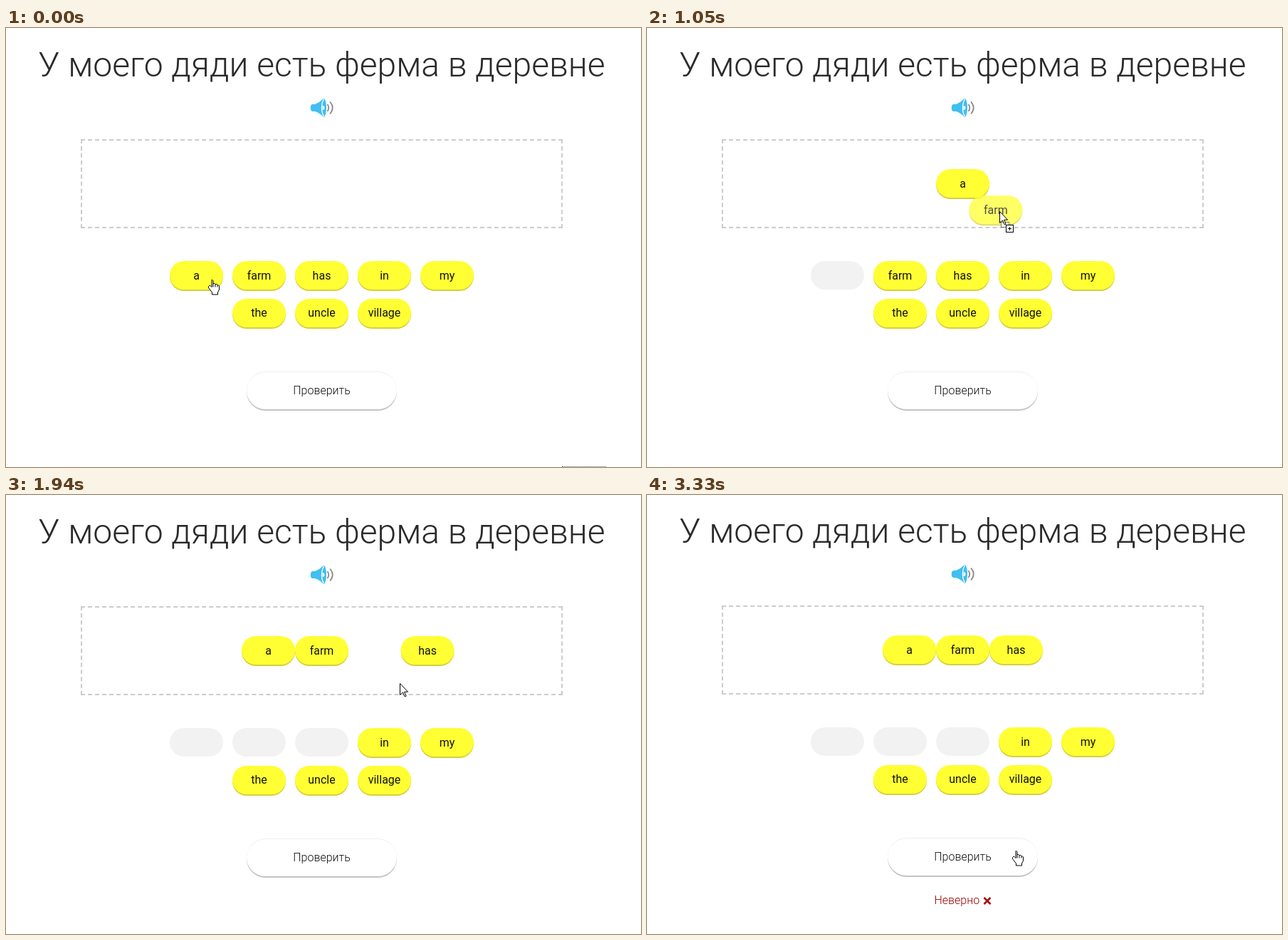
These frames come from a looping animation (892x616 px, 4.12 s). An HTML page:

```html
<!DOCTYPE html>
<html lang="ru">
<head>
<meta charset="utf-8">
<style>
html, body { margin: 0; width: 100%; height: 100%; overflow: hidden; background: #fff; }
body { position: relative; font: 16px Roboto, sans-serif; }
body div, svg { position: absolute; }
#scene { left: 0; top: 0; width: 892px; height: 616px; }
h1 { position: absolute; left: 0; top: 20px; width: 887px; margin: 0; text-align: center; white-space: nowrap;
  font-weight: 300; font-size: 48px; line-height: 64px; color: #2b2b2b; }
#zone { left: 105px; top: 156px; width: 673px; height: 121px; border: 2px dashed #ccc; }
.tile, .slot { width: 75px; height: 40px; border-radius: 20px; }
.slot { background: #f2f2f2; }
.tile { background: #ff3; box-shadow: 0 2px #d6d03c; color: #111; text-align: center; line-height: 41px; }
#check { left: 338px; top: 482px; width: 211px; height: 53px; border-radius: 27px; box-sizing: border-box;
  border-top: 1px solid #eee; box-shadow: 0 2px #c4c4c4; text-align: center; line-height: 51px; font-weight: 300; color: #111; }
#wrong { left: 403.5px; top: 560px; line-height: 20px; font-weight: 300; color: #900; white-space: nowrap; }
#mark { left: 68px; top: 5px; }
#dots { left: 781px; top: 615px; width: 62px; border-top: 1px dotted #555; }
svg { overflow: visible; }
#cursor { left: 0; top: 0; width: 1px; height: 1px; }
#cursor path, #cursor rect { fill: #fff; stroke: #000; }
</style>
</head>
<body>
<div id="scene">
  <h1>У моего дяди есть ферма в деревне</h1>
  <svg style="left:427px;top:98px" width="34" height="28" fill="none">
    <path fill="#41bff0" d="M3 9h4Q13 7 17 2.5Q19 1 20 1C24 5 24 22 20 27Q18 26.500 16 24Q12 20.500 7 19H3Q.8 18 .8 14T3 9"/>
    <path stroke="#fff" stroke-width="1.300" d="M19.500 2C15.500 8 15.500 20 19.500 26"/>
    <path fill="#fff" d="M17.500 11q3 0 3 3t-3 3z"/>
    <path stroke="#888" stroke-width="1.700" d="M24.500 9q3.500 5 0 10M28 5.500q7.500 8.500 0 17"/>
  </svg>
  <div id="zone"></div>
  <div id="check">Проверить</div>
  <div id="wrong">Неверно<svg id="mark" width="12" height="11"><path d="M1.500 1l9 9m0-9l-9 9" stroke="#a50d0d" stroke-width="2.600"/></svg></div>
</div>
<div id="dots"></div>
<svg id="cursor">
  <path id="hand" d="M0 .5h1l1 1v4h2l1 1h2l1 1h1l1.500 1.500v5l-2 4v3h-8v-3l-5-6.500v-2l1-1h1.500l2 2v-9zM2 5.500v5M5 6.500v4M8 7.500v3"/>
  <g id="copy">
    <rect x="2.500" y="15.500" width="11" height="7" stroke-dasharray="1 1"/>
    <rect x="9.500" y="19.500" width="10" height="10"/>
    <path d="M12 24.500h5M14.500 22v5"/>
  </g>
  <path id="arrow" d="M.5.5v16l4-3.600 2.700 6 2-.8-2.600-5.900h5z"/>
</svg>
<script>
const LOOP = 4120, SLIDE = 500, W = 75;
const $ = id => document.getElementById(id);
const show = (el, on) => el.style.display = on ? '' : 'none';
const place = (el, x, y) => el.style.transform = `translate(${x}px,${y}px)`;

function add(cls, text, parent = $('scene')) {
  const el = document.createElement('div');
  el.className = cls;
  el.textContent = text;
  return parent.appendChild(el);
}

const words = ['a', 'farm', 'has', 'in', 'my', 'the', 'uncle', 'village'].map((text, i) => {
  const x = i < 5 ? 230 + 88 * i : 318 + 88 * (i - 5), y = i < 5 ? 327 : 380;
  const slot = add('slot', ''), tile = add('tile', text);
  place(slot, x, y);
  if (i > 4) tile.style.lineHeight = '39px';
  return { text, x, y, tile };
});

// grab and drop times of the first three words
const drags = [[130, 565], [860, 1225], [1630, 1935]];
// pointer route: time, x, y
const route = [
  [0, 289, 353], [130, 289, 353], [180, 289, 346], [500, 298, 262], [570, 299, 260], [630, 326, 290],
  [790, 361, 347], [870, 361, 349], [960, 430, 302], [1050, 495, 257], [1150, 533, 250], [1230, 534, 252],
  [1500, 460, 330], [1570, 453, 336], [1640, 455, 346], [1720, 478, 325], [1880, 550, 265],
  [1940, 553, 264], [2030, 552, 290], [2270, 525, 462], [2400, 518, 499], [LOOP, 518, 499]
];

function pointer(t) {
  const i = route.findIndex(p => p[0] > t), [t0, x0, y0] = route[i - 1], [t1, x1, y1] = route[i];
  const k = (t - t0) / (t1 - t0);
  return [x0 + (x1 - x0) * k, y0 + (y1 - y0) * k];
}

// cubic-bezier(.25, .1, .25, 1)
function ease(p) {
  if (p >= 1) return 1;
  let lo = 0, hi = 1, s;
  for (let n = 0; n < 20; n++) {
    s = (lo + hi) / 2;
    if (.75 * s * (1 - s) + s ** 3 < p) lo = s; else hi = s;
  }
  return .3 * s * (1 - s) ** 2 + 3 * s * s * (1 - s) + s ** 3;
}

const ghost = add('tile', '', document.body);
ghost.style.opacity = .75;
document.body.append($('cursor'));

function draw(t) {
  const [x, y] = pointer(t);
  const dropped = drags.filter(d => t >= d[1]).length;
  const held = drags.findIndex(d => t >= d[0] && t < d[1]);

  words.forEach((w, i) => {
    if (i >= dropped) return place(w.tile, w.x, w.y);
    const left = Math.ceil(443.5 - dropped * W / 2) + i * W;
    place(w.tile, left + 74 * (1 - ease((t - drags[i][1]) / SLIDE)), 198);
  });

  show(ghost, held >= 0);
  if (held >= 0) {
    const w = words[held], [gx, gy] = pointer(drags[held][0]);
    ghost.textContent = w.text;
    place(ghost, w.x + x - gx, w.y + y - gy);
  }

  const inside = (l, top, wd, h) => x >= l && x < l + wd && y >= top && y < top + h;
  const over = inside(338, 482, 211, 53) || words.some((w, i) => i >= dropped && inside(w.x, w.y, W, 40));
  show($('hand'), held < 0 && over);
  show($('arrow'), held >= 0 || !over);
  show($('copy'), held >= 0);
  place($('cursor'), Math.round(x), Math.round(y));

  show($('dots'), t < 130);
  place($('scene'), 0, t < 2710 ? 0 : -1);
  $('wrong').style.opacity = Math.min(1, Math.max(0, (t - 2710) / 430));
}

const start = performance.now();
function frame() {
  draw((performance.now() - start) % LOOP);
  requestAnimationFrame(frame);
}
frame();
</script>
</body>
</html>
```
